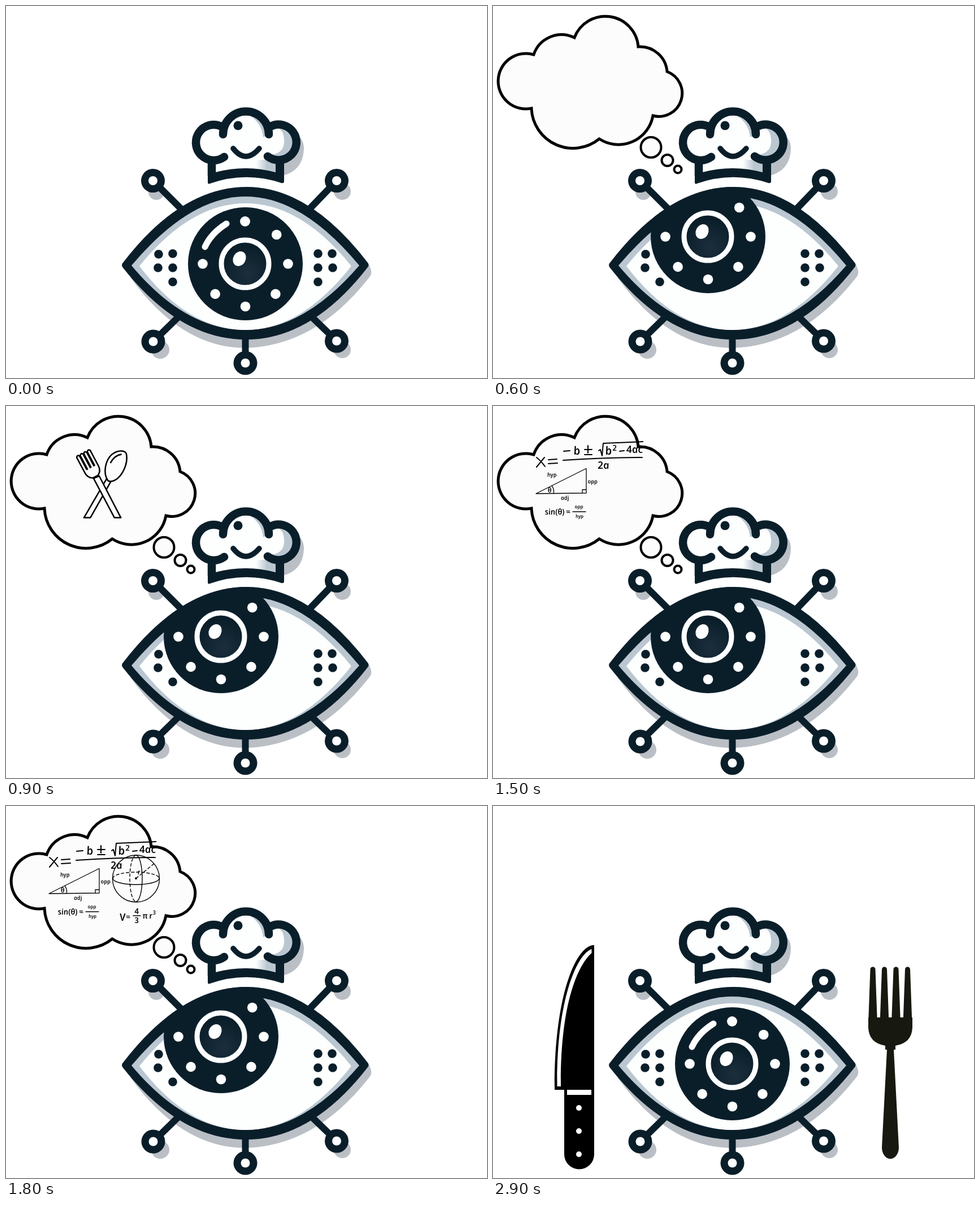
Animation of 851 by 658 pixels, one loop 3.21 s. Source, as an HTML page:

```html
<!DOCTYPE html>
<html lang="en">
<head>
<meta charset="utf-8">
<title>Thinking eye chef</title>
<style>
  html, body { margin: 0; width: 100%; height: 100%; overflow: hidden; background: #fff; }
  svg { display: block; width: 100%; height: 100%; }
  /* upright text with the round italic "a" */
  text {
    font: italic 600 10px "Open Sans", "Noto Sans", sans-serif; text-anchor: middle;
    transform-box: fill-box; transform-origin: center; transform: skewX(10deg);
  }
  .dark { fill: #0a1e2a; }
  .arm { stroke: #0a1e2a; stroke-width: 12; }
  .shadow { fill: #babec5; }
  .white { fill: #fdfefe; }
  .shade { fill: #bac7d1; }
  .ink { fill: none; stroke: #000; stroke-linecap: round; stroke-linejoin: round; }
  .hat { fill: none; stroke: #0a1e2a; stroke-width: 14.5; stroke-linecap: round; }
  .s8 { font-size: 8.5px; } .s12 { font-size: 12px; } .s14 { font-size: 14px; } .s18 { font-size: 18px; } .s20 { font-size: 20px; }
  .step { opacity: 0; }
</style>
</head>
<body>
<svg viewBox="0 0 851 658">
  <defs>
    <path id="lid" d="M207 454Q310 320 426 320Q537 320 640 454Q643 458 640 462Q541 590 424 590Q307 590 207 463Q203 458 207 454Z"/>
    <clipPath id="lids"><use href="#lid"/></clipPath>
    <clipPath id="sheet"><rect x="70" y="55" width="196" height="70"/></clipPath>
    <radialGradient id="lens" cx=".55" cy=".72" r=".6">
      <stop offset="0" stop-color="#1c2e3c"/><stop offset="1" stop-color="#0a1e2a"/>
    </radialGradient>
    <linearGradient id="fold" x1="0" x2="1">
      <stop offset=".55" stop-color="#bac7d1" stop-opacity="0"/><stop offset=".8" stop-color="#bac7d1"/>
    </linearGradient>
    <g id="iris">
      <ellipse class="dark" cx="423.5" cy="456" rx="101.5" ry="100"/>
      <circle cx="423" cy="456" r="42" fill="url(#lens)" stroke="#fdfefe" stroke-width="9"/>
      <ellipse class="white" cx="413" cy="447" rx="11" ry="13.5" transform="rotate(28 413 447)"/>
      <g id="studs" class="white"></g>
    </g>
    <g id="cutlery" fill="#fcfcfc" stroke="#000" stroke-width="1.8" stroke-linejoin="round">
      <path d="M189 150L161 198H169L195 152Z"/>
      <path d="M191 152C184 142 188 126 196 119C204 113 213 114 214 119C216 131 209 146 200 151Q195 154 191 152Z"/>
      <path d="M194 130Q199 120 208 119" fill="none"/>
      <path d="M173 149L199 198H207L180 146Z"/>
      <g transform="translate(159 117) rotate(-28)">
        <path d="M-9 21V2Q-7 -1 -5 2V21H-4V2Q-2 -1 0 2V21H1V2Q3 -1 5 2V21H6V2Q8 -1 10 2V24Q10 31 4 34H-3Q-9 31 -9 24Z"/>
      </g>
    </g>
  </defs>

  <!-- drop shadows -->
  <g class="shadow">
    <path d="M220 480Q310 605 424 605Q550 601 645 477Q649 468 640 454Z"/>
    <circle cx="266" cy="329" r="14"/><circle cx="595" cy="328" r="15"/>
    <circle cx="273" cy="608" r="16"/><circle cx="595" cy="608" r="15"/>
    <path d="M490 300Q527 290 527 250Q526 235 515 228L480 250Z"/>
  </g>

  <g id="nodes"></g>

  <!-- chef hat -->
  <path class="dark" d="M357 272V312Q357 316 361 314Q424 292 487 313Q492 314 492 310V272Z"/>
  <g class="white">
    <circle cx="365" cy="241" r="31"/><circle cx="482" cy="241" r="31"/>
    <circle cx="424" cy="227" r="40"/>
    <path d="M371 225H477V294Q424 280 371 294Z"/>
  </g>
  <path class="shade" d="M424 190Q462 192 464 228L455 232Q452 203 424 190Z"/>
  <path class="shade" d="M488 212Q514 220 512 244Q508 270 474 270L464 264Q494 262 492 236Q492 222 480 214Z"/>
  <path fill="url(#fold)" d="M400 272H477V294Q440 284 400 287Z"/>
  <path class="hat" d="M386 267A31.5 31.5 0 1 1 381 213M384 227A40.5 40.5 0 0 1 465 227M468 213A31.5 31.5 0 1 1 463 266"/>
  <path class="hat" style="stroke-linecap:butt" d="M364 270V300M484.500 270V300"/>
  <path class="hat" style="stroke-width:9.500" d="M402 252Q424 280 448 252"/>
  <circle class="dark" cx="410.500" cy="211.500" r="8"/>

  <!-- eye -->
  <use href="#lid" class="dark"/>
  <path class="shade" d="M222 459Q325 337 424 337Q524 337 625 459Q527 573 424 573Q317 573 222 459Z"/>
  <path class="white" d="M236 460Q326 349 424 349Q522 349 611 460Q522 573 424 573Q322 573 236 460Z"/>
  <g id="freckles" class="dark"></g>
  <g id="ahead" class="step">
    <g class="dark"><circle cx="295" cy="438" r="7.800"/><circle cx="295" cy="463" r="7.800"/></g>
    <use href="#iris"/>
    <circle class="white" cx="423" cy="381" r="9"/>
    <path d="M352 426Q363 402 390 385" fill="none" stroke="#fdfefe" stroke-width="11" stroke-linecap="round"/>
  </g>
  <g id="aside" class="step" clip-path="url(#lids)"><use href="#iris" x="-43" y="-48"/></g>

  <!-- thought bubble -->
  <g id="cloud" class="step" fill="#fcfcfc" stroke="#000" stroke-width="5">
    <path d="M68 181A49 49 0 1 1 72 86A52 52 0 0 1 144 56A58.500 58.500 0 0 1 257 72A48 48 0 0 1 308 116A41 41 0 0 1 283 194A62 62 0 0 1 188 235A73.500 73.500 0 0 1 68 181Z"/>
    <g stroke-width="4">
      <circle cx="279.500" cy="250" r="18"/><circle cx="308.500" cy="273" r="10"/><circle cx="327" cy="289" r="6.500"/>
    </g>
  </g>

  <g id="large" class="step"><use href="#cutlery" transform="translate(216 199) scale(1.42) translate(-216 -199)"/></g>
  <g id="small" class="step"><use href="#cutlery"/></g>

  <g id="formula" class="step">
    <g clip-path="url(#sheet)">
      <path class="ink" stroke-width="2" d="M77 91Q84 96 92 107M91 91L77 108M98 95L113 94M98 102L114 101M125 80L136 79M162 77H175M168 70V83M162 86H175M187 79L190 77L193 88L195 66L266 63M224 80L232 79M124 96Q195 91 264 91"/>
      <text class="s20" x="148" y="86">b</text><text class="s20" x="204" y="86">b</text>
      <text class="s14" x="215" y="79">2</text>
      <text class="s18" x="250" y="83">4ac</text>
      <text class="s18" x="195" y="111">2a</text>
    </g>
  </g>

  <g id="trig" class="step">
    <path class="ink" stroke-width="1.300" d="M76 155L165 110.500V154ZM158 154V148H165M104 141Q109 148 107 155M141 187H164"/>
    <text x="104" y="125">hyp</text><text x="176" y="137">opp</text><text x="127" y="166">adj</text>
    <text class="s12" x="100" y="153">θ</text>
    <text class="s14" x="109" y="192">sin(θ)</text><text class="s14" x="133" y="192">=</text>
    <text class="s8" x="152" y="181">opp</text><text class="s8" x="153" y="198">hyp</text>
  </g>

  <g id="sphere" class="step">
    <g class="ink" stroke-width="1.400">
      <circle cx="230" cy="128.500" r="41.500"/>
      <path d="M189 128A41 11 0 0 0 271 128M230 87A11 41 0 0 1 230 169"/>
      <path stroke-dasharray="5 4" d="M189 128A41 11 0 0 1 271 128M230 87A11 41 0 0 0 230 169M230 128L262 102"/>
      <path d="M225 194H238"/>
    </g>
    <circle cx="230" cy="128" r="2"/>
    <text class="s12" x="235" y="121">r</text>
    <text class="s18" x="206" y="203">V</text><text class="s14" x="216" y="201">=</text>
    <text class="s14" x="231" y="191">4</text><text class="s14" x="231" y="207">3</text>
    <text class="s14" x="246" y="199">π</text><text class="s14" x="256" y="199">r</text><text x="262" y="192">3</text>
  </g>

  <g id="bulb" class="step" fill="none" stroke="#444" stroke-width="2.700" stroke-linecap="round" stroke-linejoin="round">
    <path fill="#fbe377" d="M166 198V181A48 48 0 1 1 208 181V198Z"/>
    <path d="M179 197V141A7.500 8 0 1 0 164 143Q165 151 173 151H201Q209 151 210 143A7.500 8 0 1 0 196 141V197"/>
    <path fill="#cfd1d2" d="M166 198H208.500V217Q208 226 199 226H176Q167 226 166 217Z"/>
    <path d="M167 207H208M167 216H208"/>
    <path id="rays"/>
  </g>

  <g id="table" class="step">
    <path d="M177 246H179V616A26.500 26.500 0 0 1 126 616V502H109C108 340 145 250 177 246Z"/>
    <g fill="#fff">
      <path d="M174.500 253C148 262 112 345 113.500 496H120C119 350 150 282 174.500 260Z"/>
      <rect x="131" y="502" width="43" height="9"/>
      <circle cx="152" cy="534" r="5"/><circle cx="152" cy="575" r="5"/><circle cx="152" cy="616" r="5"/>
    </g>
    <g fill="#17180f">
      <path id="tines"/>
      <path d="M664 374H742V392Q741 419 712 424V431H709L718 604A15 20 0 0 1 688 604L697 431H694V424Q665 419 664 392Z"/>
    </g>
  </g>
</svg>
<script>
const LOOP = 3210;
const $ = id => document.getElementById(id);
const dot = (x, y, r, cls = "") => `<circle cx="${x}" cy="${y}" r="${r}" class="${cls}"/>`;
const polar = (cx, cy, r, deg) => {
  const a = deg * Math.PI / 180;
  return [cx + r * Math.cos(a), cy + r * Math.sin(a)];
};

// node: centre, then where its arm meets the eye
const nodes = [
  [260, 309, 310, 359], [585, 309, 537, 359], [260.5, 593.5, 306, 549],
  [585, 592.5, 540, 549], [423.5, 631.5, 423.5, 585]
];
$("nodes").innerHTML = nodes.map(([x, y, ax, ay]) =>
  `<line class="arm" x1="${x}" y1="${y}" x2="${ax}" y2="${ay}"/>` +
  dot(x, y, 21, "dark") + dot(x, y, 8, "white")).join("");

$("studs").innerHTML = [-43, 0, 45, 90, 135, 180]
  .map(a => dot(...polar(423.5, 456, 75.5, a), 8.8)).join("");

$("freckles").innerHTML = [
  [270, 439], [269, 463], [295, 488], [552, 438], [577, 438], [552, 463], [578, 463], [552, 488]
].map(([x, y]) => dot(x, y, 7.8)).join("");

let rays = "";
for (let i = 0; i < 16; i++) {
  if (i > 2 && i < 6) continue;
  const a = i * 22.5;
  rays += `M${polar(187.5, 138, 63, a)}L${polar(187.5, 138, i % 2 ? 78 : 92, a)}`;
}
$("rays").setAttribute("d", rays);

$("tines").setAttribute("d", [672, 692.5, 713, 733.5].map(x =>
  `M${x - 4.5} 289A4.5 4.5 0 0 1 ${x + 4.5} 289L${x + 7.7} 377H${x - 7.7}Z`).join(""));

// when each part is shown, in ms
const shown = {
  ahead: [[0, 300], [2100, LOOP]],
  aside: [[300, 2100]],
  cloud: [[600, 2900]],
  large: [[900, 1200]],
  small: [[1200, 1500]],
  formula: [[1200, 2100]],
  trig: [[1500, 2100]],
  sphere: [[1800, 2100]],
  bulb: [[2100, 2900]],
  table: [[2900, LOOP]]
};

function draw() {
  const t = performance.now() % LOOP;
  for (const id in shown) {
    $(id).style.opacity = shown[id].some(([a, b]) => t >= a && t < b) ? 1 : 0;
  }
  requestAnimationFrame(draw);
}
draw();
</script>
</body>
</html>
```
